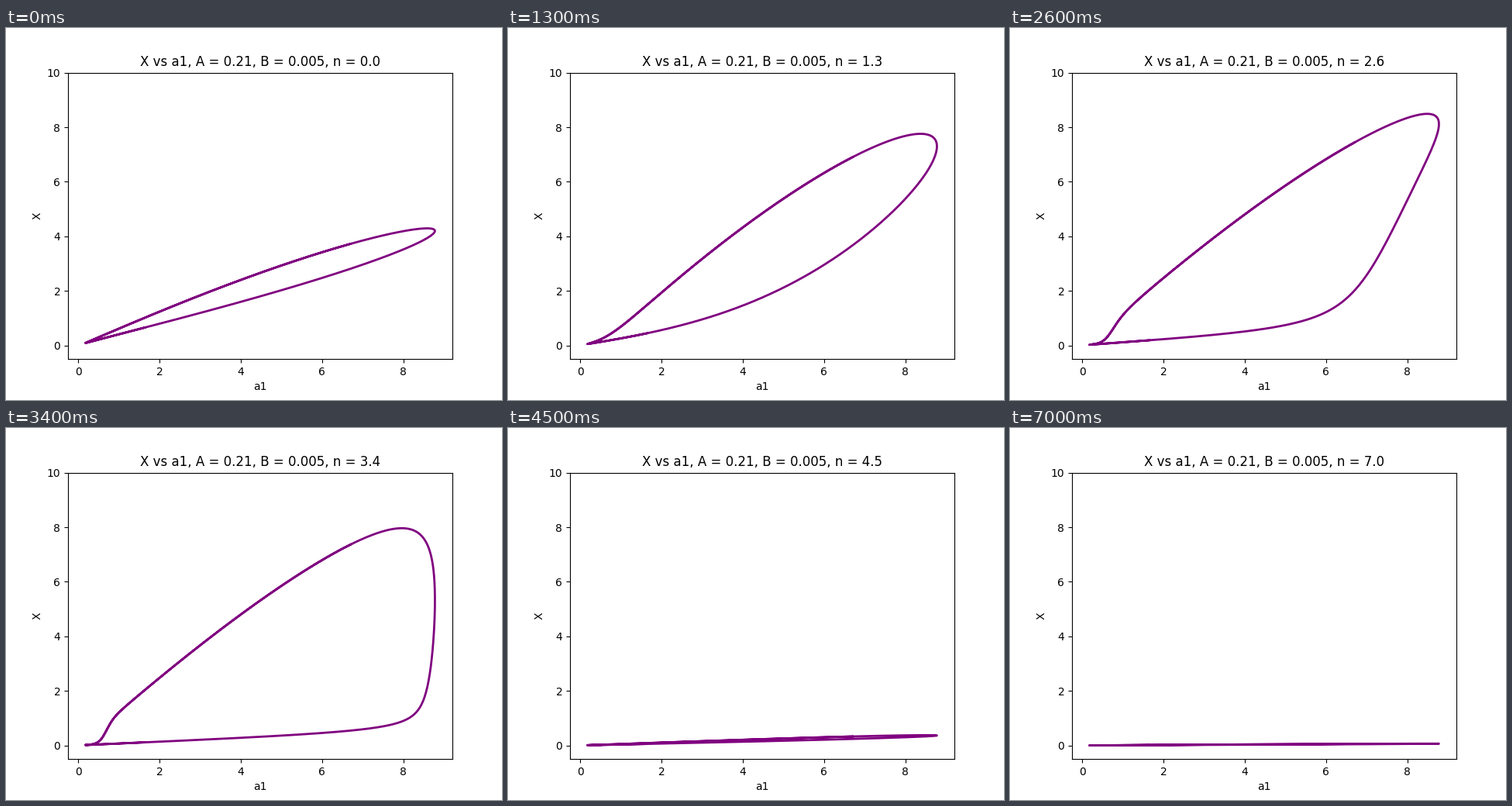
Animation, 640 px wide and 480 px high, one loop 7.1 s. Source, as a matplotlib script:

```python
import numpy as np
import matplotlib.pyplot as plt
from matplotlib.animation import FuncAnimation

A, B = 0.21, 0.005
A2 = 2.0                      # constant drive of the second gene
A1_MIN, A1_MAX = 0.18, 8.78   # range of the oscillating drive
A1_MEAN = (A1_MAX - A1_MIN) / np.log(A1_MAX / A1_MIN)
GROWTH, DEATH = 0.0325, 0.5   # predator-prey rates behind a1

DT, T_SKIP, T_END = 0.04, 60, 160
N = np.arange(71) / 10


def slope(state):
    """Toggle switch (x, y) whose drive a1 follows a predator-prey cycle."""
    prey, a1, x, y = state
    return np.array([
        GROWTH * prey * (1 - a1 / A1_MEAN),
        DEATH * a1 * (prey - 1),
        a1 / (1 + y ** N) - x,
        A2 / (1 + x ** N) - y,
    ])


def simulate():
    state = np.outer([1.0, A1_MAX, 0.1, 1.0], np.ones(len(N)))
    a1, x = [], []
    for step in range(int(T_END / DT)):
        k1 = slope(state)
        k2 = slope(state + DT / 2 * k1)
        k3 = slope(state + DT / 2 * k2)
        k4 = slope(state + DT * k3)
        state = state + DT / 6 * (k1 + 2 * k2 + 2 * k3 + k4)
        if step * DT >= T_SKIP:
            a1.append(state[1])
            x.append(state[2])
    return np.array(a1), np.array(x)


a1_path, x_path = simulate()

fig, ax = plt.subplots(figsize=(6.4, 4.8), dpi=100)
line, = ax.plot([], [], color="purple", lw=2)
pad = 0.05 * (A1_MAX - A1_MIN)
ax.set_xlim(A1_MIN - pad, A1_MAX + pad)
ax.set_ylim(-0.5, 10)
ax.set_xlabel("a1")
ax.set_ylabel("X")
title = ax.set_title("")


def update(i):
    line.set_data(a1_path[:, i], x_path[:, i])
    title.set_text(f"X vs a1, A = {A}, B = {B}, n = {N[i]:.1f}")
    return line, title


anim = FuncAnimation(fig, update, frames=len(N), interval=100, repeat=True,
                     repeat_delay=0, blit=False)
plt.show()
```
